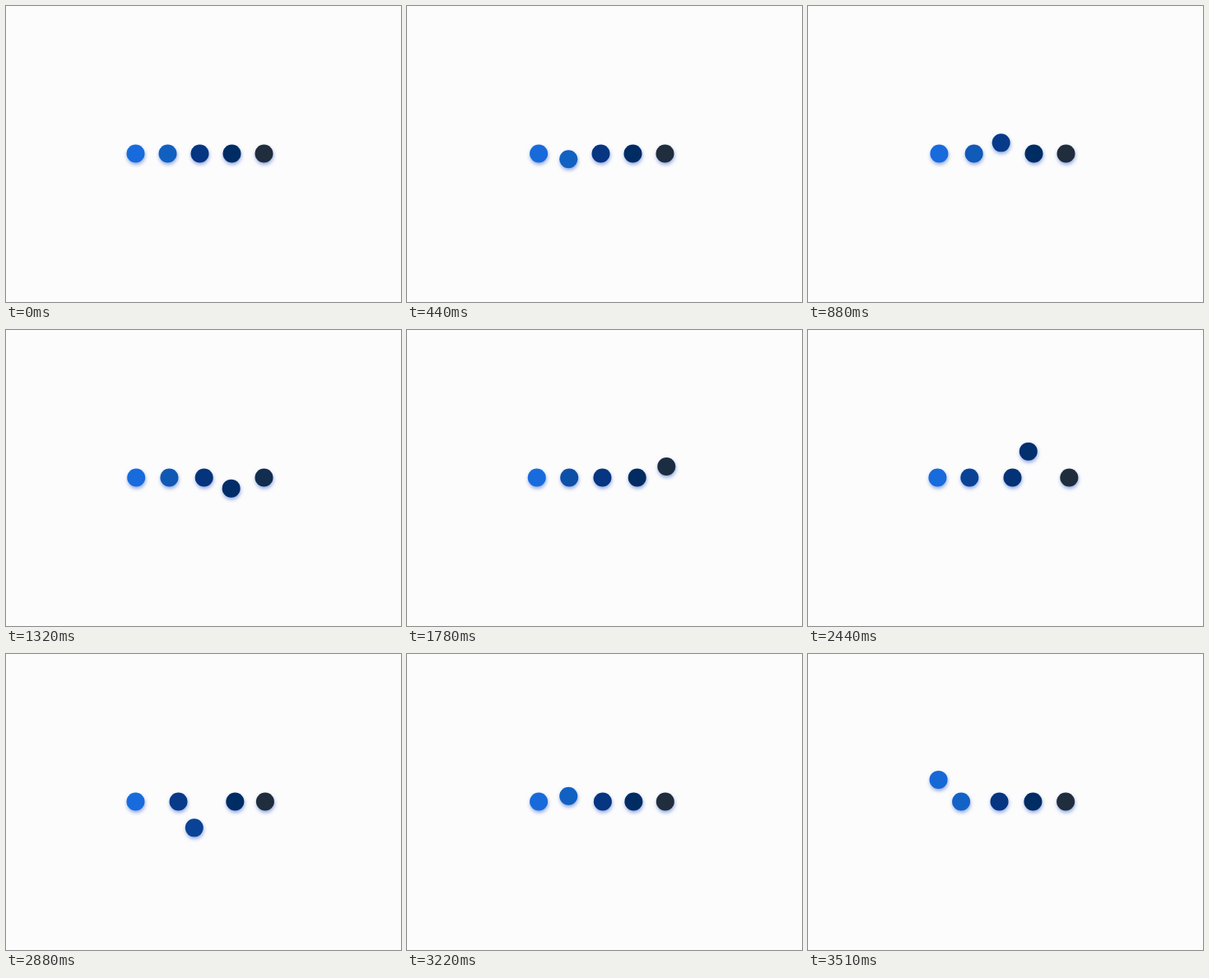
Recreate the animation shown at these times as an HTML page with a canvas. Size 480x360 px, loop 3.53 s.

```html
<!DOCTYPE html>
<html lang="en">
<head>
<meta charset="utf-8">
<title>Hopping dots</title>
<style>
  html, body { margin: 0; width: 100%; height: 100%; overflow: hidden; background: #fcfcfc; }
  canvas { display: block; width: 480px; height: 360px; }
</style>
</head>
<body>
<canvas id="stage" width="480" height="360"></canvas>
<script>
const ctx = document.getElementById('stage').getContext('2d');
const LOOP = 3530, HOP = 15, GAP = 39, RADIUS = 11, LEFT = 157.5, MIDDLE = 179.5, HANDLE = 54.7;
const colors = [[24, 107, 220], [17, 96, 192], [6, 53, 129], [0, 44, 100], [32, 45, 61]];
const lean = [-8, 0, 0, 0, 12];   // how far the arcs bulge out at each slot

const slotX = i => LEFT + GAP * i;
const clamp = v => Math.min(1, Math.max(0, v));
const mix = (a, b, k) => `rgb(${a.map((v, i) => Math.round(v + (b[i] - v) * k))})`;

// Four hops to the right and four back, alternately below and above the row
const hops = Array.from({ length: 8 }, (_, h) => {
  const from = h < 4 ? h : 8 - h, to = h < 4 ? h + 1 : 7 - h;
  const x1 = slotX(from), x2 = slotX(to);
  const y = MIDDLE + (h % 2 ? -HANDLE : HANDLE);
  const path = document.createElementNS('http://www.w3.org/2000/svg', 'path');
  path.setAttribute('d',
    `M${x1} ${MIDDLE}C${x1 + lean[from]} ${y} ${x2 + lean[to]} ${y} ${x2} ${MIDDLE}`);
  return { from, to, path, length: path.getTotalLength() };
});

// Linear move followed by a damped overshoot
function spring(steps) {
  if (steps < HOP) return clamp(steps / HOP);
  const s = (steps - HOP) / 30;
  return 1 + Math.sin(4 * Math.PI * s) / (2 * Math.PI) * Math.exp(-2 * s);
}

function drawDot(x, y, color) {
  ctx.fillStyle = color;
  ctx.beginPath();
  ctx.arc(x, y, RADIUS, 0, 2 * Math.PI);
  ctx.fill();
}

function stepAt(ms) {
  if (ms < 50) return 0;
  const step = Math.floor(1 + (ms - 50) / 30);
  return ms < 610 ? Math.min(18, step) : step;
}

function draw(step) {
  ctx.shadowColor = 'transparent';
  ctx.fillStyle = '#fcfcfc';
  ctx.fillRect(0, 0, 480, 360);
  ctx.shadowColor = 'rgba(40, 85, 200, 0.5)';
  ctx.shadowBlur = 4;
  ctx.shadowOffsetX = 0.5;
  ctx.shadowOffsetY = 2.5;

  for (let i = 1; i < 5; i++) {
    const leave = HOP * (i - 1), back = HOP * (8 - i);
    const shift = step < back ? spring(step - leave) : 1 - spring(step - back);
    // The middle dot fades back slowly, the last one starts fading early
    const fadeOut = i === 4 ? 30 : leave, fadeBack = i === 2 ? 30 : back;
    const tint = clamp((step - fadeOut) / (leave + HOP - fadeOut))
               - clamp((step - fadeBack) / (back + HOP - fadeBack));
    drawDot(slotX(i) - GAP * shift, MIDDLE, mix(colors[i], colors[i - 1], tint));
  }

  const hop = hops[Math.floor(step / HOP) % 8], progress = step % HOP / HOP;
  const p = hop.path.getPointAtLength(hop.length * progress);
  drawDot(p.x, p.y, mix(colors[hop.from], colors[hop.to], progress));
}

const start = performance.now();
function tick() {
  draw(stepAt((performance.now() - start) % LOOP));
  requestAnimationFrame(tick);
}
tick();
</script>
</body>
</html>
```
